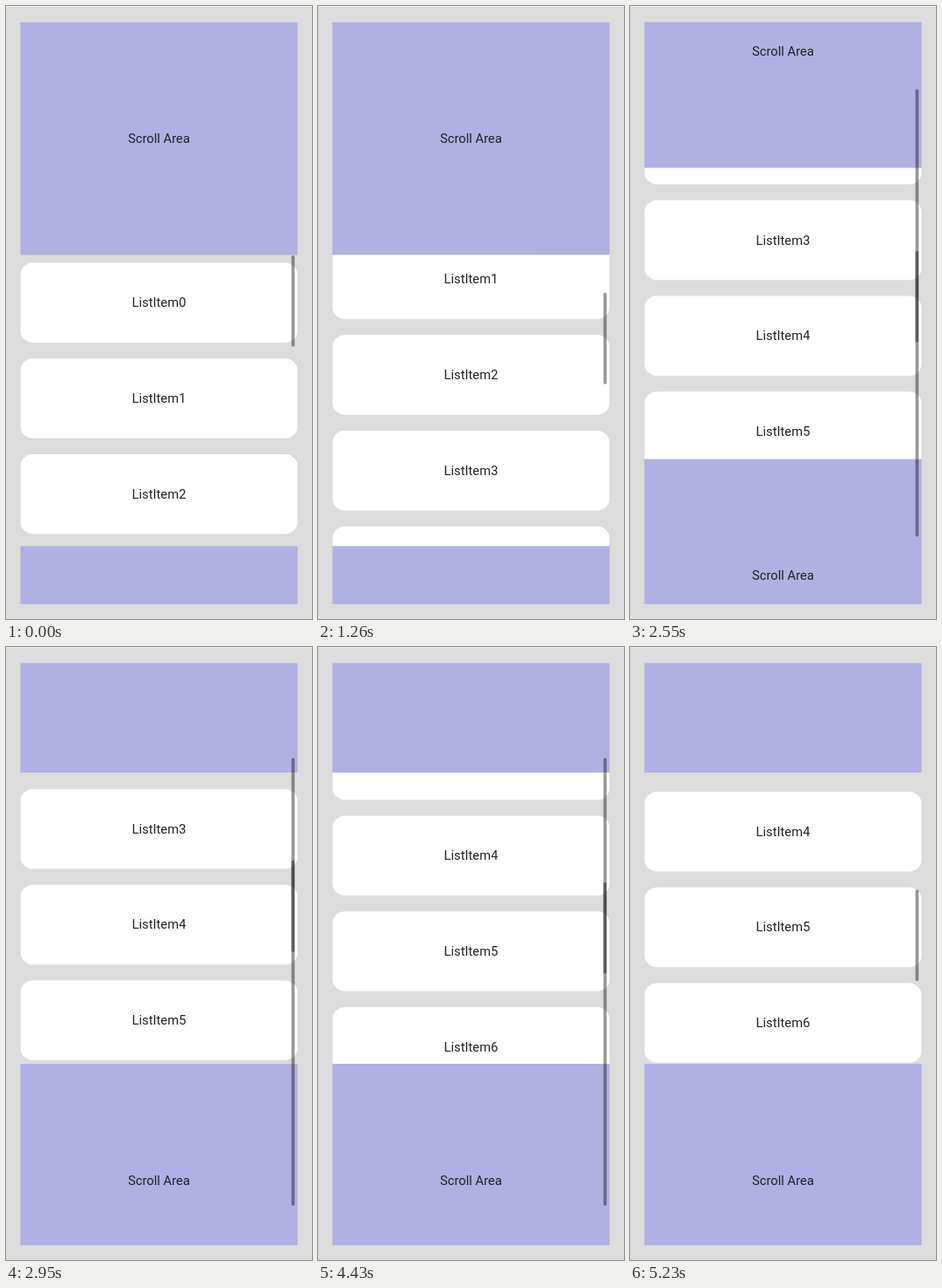
An HTML page that plays this animation: 351 px wide and 703 px high, repeating every 6.1 s.

```html
<!DOCTYPE html>
<html lang="en">
<head>
<meta charset="utf-8">
<style>
  html, body { margin: 0; width: 100%; height: 100%; overflow: hidden; background: #dcdcdc; }
  svg { display: block; }
  text { font: 14.75px Roboto, "Open Sans", sans-serif; fill: #222226; text-anchor: middle; }
  .block { fill: #b0b0e2; }
  .card { fill: #fff; }
  .bar { fill: #000; fill-opacity: .4; }
</style>
</head>
<body>
<svg id="stage" width="100%" height="100%" viewBox="0 0 351 703">
  <rect width="351" height="703" fill="#dcdcdc"/>
  <rect width="351" height="1" fill="#ececec"/>
  <svg x="16.3" y="18.5" width="318.4" height="667.5" overflow="hidden">
    <g id="page">
      <rect class="block" width="318.4" height="267"/>
      <text x="159.2" y="138.6">Scroll Area</text>
      <svg y="267" width="318.4" height="334" overflow="hidden">
        <g id="list"></g>
        <rect id="listBar" class="bar" x="311.1" width="3.7" height="105" rx="1.8"/>
      </svg>
      <rect class="block" y="601" width="318.4" height="267"/>
      <text x="159.2" y="739.6">Scroll Area</text>
    </g>
    <rect id="pageBar" class="bar" x="311.1" width="3.7" height="513.4" rx="1.8"/>
  </svg>
</svg>
<script>
const LOOP = 6100, TICK = 40;
const WIDTH = 318.4, PITCH = 109.7, CARD = 91.4, PAD = 9.1;
const PAGE_RATIO = 0.769, LIST_RATIO = 0.3147;
const NEST = 0.435; // share of page scrolling passed on to the list
const RECYCLE = 4;  // a card with less than this left in view is dropped

const easeOut = n => p => 1 - (1 - p) ** n;
const easeInOut = n => p => p < 0.5 ? (2 * p) ** n / 2 : 1 - (2 - 2 * p) ** n / 2;

const pageMove = { start: 2310, end: 2950, by: 141.5, ease: easeOut(2.6) };
const listMoves = [
  { start: 660, end: 1300, by: 137.4, ease: easeOut(1.9) },
  { start: 1340, end: 1780, by: 120.2, ease: easeOut(4) },
  { start: 3860, end: 4140, by: 79.1, ease: easeInOut(2.5) },
  { start: 4390, end: 5230, by: 27.6, ease: easeInOut(2.5) }
];
const starts = [pageMove, ...listMoves].map(m => m.start).sort((a, b) => a - b);

const $ = id => document.getElementById(id);
const page = $("page"), list = $("list"), pageBar = $("pageBar"), listBar = $("listBar");

function add(parent, tag, attrs = {}, label = "") {
  const el = document.createElementNS("http://www.w3.org/2000/svg", tag);
  for (const key in attrs) el.setAttribute(key, attrs[key]);
  el.textContent = label;
  parent.append(el);
  return el;
}

const cards = Array.from({ length: 10 }, (_, i) => {
  const top = PAD + i * PITCH;
  const node = add(list, "g");
  add(node, "rect", { class: "card", y: top, width: WIDTH, height: CARD, rx: 14.5 });
  add(node, "text", { x: WIDTH / 2, y: top + CARD / 2 + 5 }, "ListItem" + i);
  return { node, bottom: top + CARD };
});

const clamp = v => Math.min(1, Math.max(0, v));
const offset = (m, t) => m.by * m.ease(clamp((t - m.start) / (m.end - m.start)));

// Moves advance in ticks counted from their own start.
function snap(t) {
  const start = starts.filter(s => s <= t).pop() ?? 0;
  return start + Math.floor((t - start) / TICK) * TICK;
}

function render(time) {
  const t = snap(time % LOOP);
  const outer = offset(pageMove, t);
  const inner = listMoves.reduce((sum, m) => sum + offset(m, t), NEST * outer);
  const fade = t <= pageMove.start ? 0 : clamp((5230 - t) / 200);
  page.setAttribute("transform", `translate(0 ${-outer})`);
  list.setAttribute("transform", `translate(0 ${-inner})`);
  for (const { node, bottom } of cards)
    node.setAttribute("visibility", bottom - inner < RECYCLE ? "hidden" : "visible");
  listBar.setAttribute("y", 0.3 + inner * LIST_RATIO);
  pageBar.setAttribute("y", outer * PAGE_RATIO);
  pageBar.setAttribute("opacity", fade);
}

const begin = performance.now();
function loop() {
  render(performance.now() - begin);
  requestAnimationFrame(loop);
}
loop();
</script>
</body>
</html>
```
